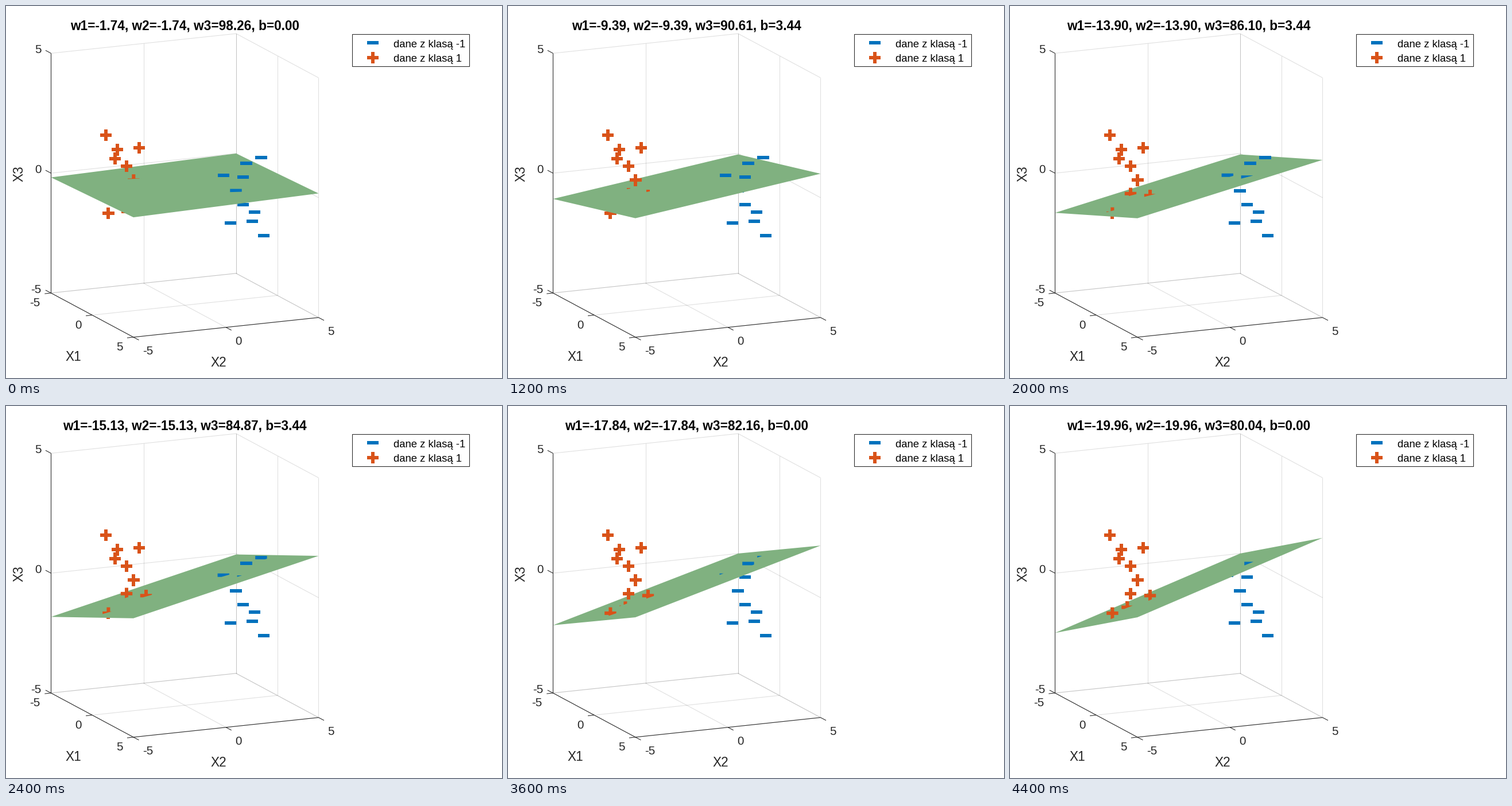
Recreate the animation shown at these times as a matplotlib script. Size 864 by 648 pixels, loop 4800 ms.

```python
import numpy as np
import matplotlib.pyplot as plt
from matplotlib.animation import FuncAnimation
from matplotlib.collections import PolyCollection
from matplotlib.patches import Rectangle

W, H = 864, 648
DARK = "#262626"
RED, BLUE, GREEN = "#d95319", "#0072bd", "#80b180"
plt.rcParams["font.family"] = "Liberation Sans"

# Orthographic view: screen centre, pixels per unit, azimuth and elevation.
CX, CY = 311.4, 312.5
KX, KY = 35.3, 42.6
AZ, EL = np.radians(66.0), np.radians(11.4)
RIGHT = np.array([np.cos(AZ), np.sin(AZ), 0])
UP = np.array([-np.sin(AZ) * np.sin(EL), np.cos(AZ) * np.sin(EL), np.cos(EL)])
FRONT = np.array([np.sin(AZ) * np.cos(EL), -np.cos(AZ) * np.cos(EL), np.sin(EL)])

# Class 1 samples: screen x, screen y, depth. Class -1 mirrors them in the origin.
SAMPLES = [(174, 225, -2), (194, 250.3, -2), (190, 265.6, -2), (232, 246.7, -2),
           (210, 279, -2), (222.3, 303.4, -1.7), (210, 326.8, -2),
           (244, 330.3, -0.35), (178.4, 360.9, 1.6), (204.4, 350.6, -1.1)]


def weights(k):
    """Weight vector and bias after training step k."""
    a = -np.interp(k, [0, 3, 6, 10, 14, 18, 22],
                   [1.74, 5.90, 9.39, 13.90, 16.36, 17.84, 19.96])
    level = max(0, np.ceil((6 - abs(k - 8.3)) / 2.25))
    return np.array([a, a, 100 + a]), 1.72 * level


def project(p):
    return CX + KX * (RIGHT @ p), CY - KY * (UP @ p)


def plus(x, y, r=10.2, h=3.0):
    return [(x - r, y - h), (x - h, y - h), (x - h, y - r), (x + h, y - r),
            (x + h, y - h), (x + r, y - h), (x + r, y + h), (x + h, y + h),
            (x + h, y + r), (x - h, y + r), (x - h, y + h), (x - r, y + h)]


def minus(x, y, r=10.2, h=3.0):
    return [(x - r, y - h), (x + r, y - h), (x + r, y + h), (x - r, y + h)]


def clip(poly, side):
    """Keep the part of a polygon where side(x, y) is positive."""
    out = []
    for p, q in zip(poly, poly[1:] + poly[:1]):
        a, b = side(*p), side(*q)
        if a > 0:
            out.append(p)
        if (a > 0) != (b > 0):
            s = a / (a - b)
            out.append((p[0] + s * (q[0] - p[0]), p[1] + s * (q[1] - p[1])))
    return out


def in_front(w, b, depth):
    """Signed test for a screen-parallel marker against the plane."""
    def side(x, y):
        return (w @ RIGHT * (x - CX) / KX + w @ UP * (CY - y) / KY
                + w @ FRONT * depth + b)
    return side


fig = plt.figure(figsize=(W / 100, H / 100), dpi=100, facecolor="white")
ax = fig.add_axes([0, 0, 1, 1])
ax.set_xlim(0, W)
ax.set_ylim(H, 0)
ax.axis("off")


def line(p, q, alpha=1.0, z=1):
    ax.plot(*zip(p, q), color=DARK, lw=0.76, alpha=alpha, zorder=z,
            solid_capstyle="butt")


def text(x, y, s, px, color=DARK, **kw):
    return ax.text(x, y, s, fontsize=px * 0.72, color=color, zorder=6, **kw)


def grid(p, q):
    line(project(p), project(q), 0.15)


def tick(p, step, value, offset, ha):
    x, y = project(p)
    line((x, y), (x + step[0], y + step[1]), z=2)
    text(x + offset[0], y + offset[1], str(value), 20.57, ha=ha)


for v in (-5, 0, 5):
    grid((v, -5, -5), (v, 5, -5))
    grid((-5, v, -5), (5, v, -5))
    grid((-5, v, -5), (-5, v, 5))
    grid((-5, -5, v), (-5, 5, v))
    grid((v, 5, -5), (v, 5, 5))
    grid((-5, 5, v), (5, 5, v))
    tick((-5, -5, v), (-9.5, -5), v, (-16.8, 0), "right")
    tick((v, -5, -5), (-11, 1.2), v, (-18.8, 23.3), "right")
    tick((5, v, -5), (9.5, 5), v, (16, 30), "left")

for end in ((-5, -5, 5), (5, -5, -5)):
    line(project((-5, -5, -5)), project(end), z=2)
line(project((5, -5, -5)), project((5, 5, -5)), z=2)

text(117.5, 618, "X1", 22.63, ha="center")
text(370.5, 628, "X2", 22.63, ha="center")
text(29.5, 292, "X3", 22.63, ha="center", va="center", rotation=90,
     rotation_mode="anchor").set_verticalalignment("baseline")
title = text(311.3, 41.6, "", 22.63, "black", ha="center", weight="bold")

ax.add_patch(Rectangle((602.5, 48.5), 204, 56, fc="white", ec=DARK, lw=0.76))
ax.add_collection(PolyCollection([minus(639, 64, 9.6)], fc=BLUE, ec="none"))
ax.add_collection(PolyCollection([plus(639, 90, 9.6)], fc=RED, ec="none"))
text(675, 71.6, "dane z klasą -1", 18.52, "black")
text(675, 97, "dane z klasą 1", 18.52, "black")

MARKS = []
for x, y, d in SAMPLES:
    MARKS.append((minus(2 * CX - x, 2 * CY - y), -d, BLUE))
    MARKS.append((plus(x, y), d, RED))
ax.add_collection(PolyCollection([m[0] for m in MARKS],
                                 fc=[m[2] for m in MARKS], ec="none", zorder=3))
plane = PolyCollection([], fc=GREEN, ec="none", zorder=4)
front = PolyCollection([], ec="none", zorder=5)
ax.add_collection(plane)
ax.add_collection(front)


def update(i):
    w, b = weights(min(i, 22))
    corners = [(-5, -5), (5, -5), (5, 5), (-5, 5)]
    plane.set_verts([[project((x, y, -(w[0] * x + w[1] * y + b) / w[2]))
                      for x, y in corners]])
    shown = [(clip(poly, in_front(w, b, d)), c) for poly, d, c in MARKS]
    shown = [s for s in shown if len(s[0]) > 2]
    front.set_verts([s[0] for s in shown])
    front.set_facecolor([s[1] for s in shown])
    title.set_text(f"w1={w[0]:.2f}, w2={w[1]:.2f}, w3={w[2]:.2f}, b={b:.2f}")
    return plane, front, title


anim = FuncAnimation(fig, update, frames=24, interval=200, repeat=True,
                     repeat_delay=0, blit=False)
plt.show()
```
